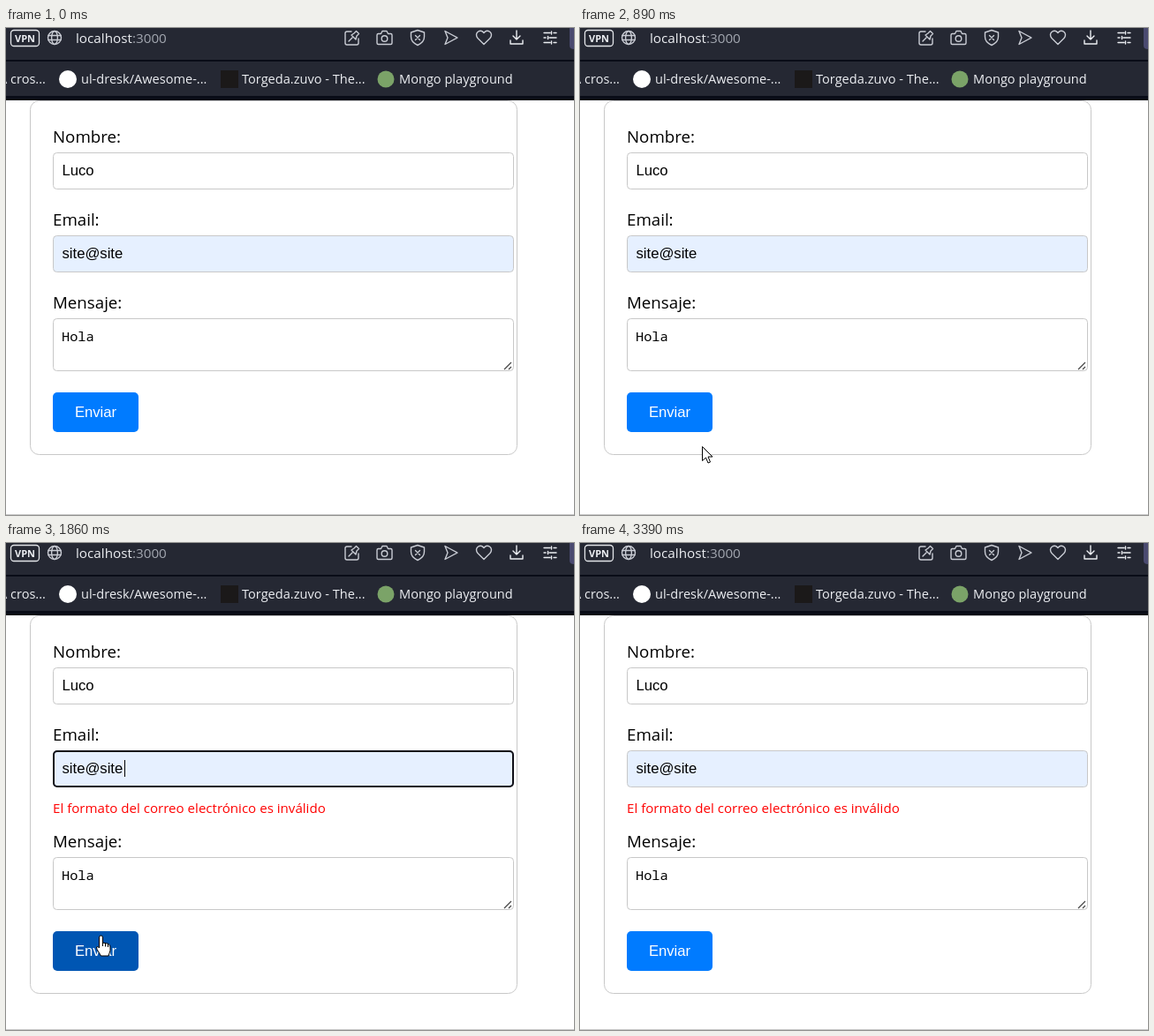
These frames come from a looping animation (643 px wide and 552 px high, 3.62 s). An HTML page:

```html
<!DOCTYPE html>
<html lang="es">
<head>
<meta charset="utf-8">
<title>Formulario</title>
<style>
html, body { margin: 0; width: 100%; height: 100%; overflow: hidden; background: #fff; }
svg { display: block; }
text { font-family: "Open Sans", "Noto Sans", sans-serif; white-space: pre; }
.bar text { font-size: 14.57px; fill: #eceef2; }
.icons { fill: none; stroke: #c9ccd4; stroke-width: 1.4; stroke-linejoin: round; stroke-linecap: round; }
.label { font-size: 18.7px; }
.value { font: 16.67px "Liberation Sans", Arial, sans-serif; }
.box { fill: #fff; stroke: #c8c8c8; }
.cursor { fill: #fff; stroke: #000; stroke-linejoin: round; }
</style>
</head>
<body>
<svg width="643" height="552" viewBox="0 0 643 552">
  <rect width="643" height="552" fill="#fff"/>
  <rect class="box" x="27.5" y="82.5" width="551" height="401" rx="10" id="card"/>

  <g class="bar">
    <rect width="643" height="82" fill="#090c17"/>
    <rect width="643" height="36" fill="#252833"/>
    <rect y="38" width="643" height="39" fill="#252833"/>
    <path d="M643 0h-5v20q0 4 5 4z" fill="#4a4a70"/>
    <rect x="5.5" y="2.5" width="32" height="18" rx="3.5" fill="none" stroke="#e4e6ea" stroke-width="1.3"/>
    <text x="21.5" y="16" text-anchor="middle" style="font-size:11px;font-weight:700">VPN</text>
    <text x="79" y="17" style="font-size:15.25px">localhost<tspan fill="#a3a7b0">:3000</tspan></text>
    <text x="45" y="63" text-anchor="end">A cros...</text>
    <circle cx="70" cy="58" r="10" fill="#fff"/>
    <text x="85" y="63">ul-dresk/Awesome-...</text>
    <rect x="243" y="48" width="20" height="20" fill="#1b1919"/>
    <text x="267" y="63">Torgeda.zuvo - The...</text>
    <circle cx="430" cy="58" r="9.5" fill="#7ba368"/>
    <text x="445" y="63">Mongo playground</text>
    <g class="icons">
      <circle cx="55" cy="11" r="7.5"/>
      <ellipse cx="55" cy="11" rx="3.4" ry="7.5"/>
      <path d="M48 8.5h14M48 13.5h14"/>
      <path d="M391 4h-5q-2 0-2 2v11q0 2 2 2h11q2 0 2-2v-5M388 15l4-4M391 8l5 5 1-4 2.500-2.500-3-3L394 6z"/>
      <path d="M421.500 6.500h3l1.500-3h5l1.500 3h3q1.500 0 1.500 1.500v9q0 1.500-1.500 1.500h-14q-1.500 0-1.500-1.500v-9q0-1.500 1.500-1.500z"/>
      <circle cx="428.500" cy="12" r="3.300"/>
      <path d="M466 2.500l7.500 2.500v5q0 6-7.500 9.500-7.500-3.500-7.500-9.500v-5zM463.500 8.500l5 5m0-5l-5 5"/>
      <path d="M497 3.500l14 7.500-14 7.500 3-7.500z"/>
      <path d="M541 18.500l-7-7q-3-4 0-7 4-3 7 1 3-4 7-1 3 3 0 7z"/>
      <path d="M578 3v10m-4-4l4 4 4-4M571 14v4h14v-4" stroke="#eceef2"/>
      <path d="M609 5.500h7m4 0h3M609 11h2m4 0h8M609 16.500h7m4 0h3M617.500 4v3M613.500 9.500v3M617.500 15v3" stroke="#eceef2"/>
    </g>
  </g>

  <text class="label" x="53" y="130">Nombre:</text>
  <rect class="box" x="53.5" y="141.5" width="521" height="41" rx="4"/>
  <text class="value" x="63.5" y="167">Luco</text>
  <text class="label" x="53" y="224">Email:</text>
  <rect x="53.5" y="235.5" width="521" height="41" rx="4" fill="#e6f0ff" stroke="#c8c8c8"/>
  <rect id="focus" x="54" y="236" width="520" height="40" rx="4" fill="none" stroke="#101018" stroke-width="2"/>
  <text class="value" x="63.5" y="261">site@site</text>
  <rect id="caret" x="134" y="246" width="1" height="19"/>
  <text id="error" x="53" y="306" font-size="15.1" fill="#f00">El formato del correo electrónico es inválido</text>

  <g id="lower">
    <text class="label" x="53" y="318">Mensaje:</text>
    <rect class="box" x="53.5" y="329.5" width="521" height="59" rx="4"/>
    <text x="63" y="355" style="font:15.3px 'Noto Sans Mono','DejaVu Sans Mono',monospace">Hola</text>
    <path d="M564 387l8-8M569 387l3-3" stroke="#444" stroke-width="1.2"/>
    <rect id="button" x="53" y="413" width="97" height="45" rx="5"/>
    <text class="value" x="101.500" y="441" text-anchor="middle" fill="#fff">Enviar</text>
  </g>
  <path d="M0 551.5h643" stroke="#c8c8c8"/>

  <path id="arrow" class="cursor" d="M.5 .5v16l4-3.500 2.500 6 2.500-1-2.500-6h5z"/>
  <g id="hand" class="cursor">
    <path d="M-1.500 2a2 2 0 0 1 4 0v6l6 1.200q2.500 .8 2.500 3.800v4l-2 6h-8.500l-4.500-7.500q-1.500-3.500 1-3l1.500 1.500z"/>
    <path d="M2.500 8v4M5.500 9v3.500M8.500 9.500v3.500" fill="none"/>
  </g>
  <circle id="click" cx="107" cy="444" r="15" fill="#ffe600" fill-opacity=".55"/>
</svg>
<script>
const LOOP = 3620;
const el = id => document.getElementById(id);
const show = (id, on) => el(id).setAttribute('visibility', on ? 'visible' : 'hidden');
const clamp = x => Math.max(0, Math.min(1, x));

// Pointer path: time, x, y
const path = [
  [340, 304, 549], [380, 262, 541], [420, 226, 526], [500, 184, 506], [600, 160, 490],
  [720, 147, 481], [860, 139, 475], [890, 138, 474], [1000, 130, 463], [1050, 126, 457],
  [1200, 114, 449], [1390, 107, 445], [2620, 107, 445], [2640, 119, 445], [2690, 156, 447],
  [2780, 268, 470], [2880, 432, 508], [2930, 546, 545], [2950, 558, 552]
];

function pointer(t) {
  const i = path.findIndex(p => p[0] > t);
  if (i < 1) return null;
  const a = path[i - 1], b = path[i], k = (t - a[0]) / (b[0] - a[0]);
  return [1, 2].map(n => Math.round(a[n] + (b[n] - a[n]) * k));
}

function buttonColor(t) {
  const hover = clamp((t - 1040) / 300) - clamp((t - 2685) / 265);
  const k = hover * hover * (3 - 2 * hover);
  return `rgb(0,${Math.round(123 - 37 * k)},${Math.round(255 - 76 * k)})`;
}

function draw(now) {
  const t = now % LOOP;
  const invalid = t >= 1840, focused = invalid && t < 3390;
  const shift = invalid ? 27 : 0;
  el('card').setAttribute('height', 401 + shift);
  el('lower').setAttribute('transform', `translate(0 ${shift})`);
  el('button').setAttribute('fill', buttonColor(t));
  show('error', invalid);
  show('focus', focused);
  show('caret', focused && (t < 2380 || t >= 2880));

  const p = pointer(t), over = t >= 1040 && t < 2685;
  show('arrow', p && !over);
  show('hand', p && over);
  if (p) el(over ? 'hand' : 'arrow').setAttribute('transform', `translate(${p})`);
  show('click', t >= 1620 && t < 1660);
}

let start;
function tick(now) {
  start ??= now;
  draw(now - start);
  requestAnimationFrame(tick);
}
draw(0);
requestAnimationFrame(tick);
</script>
</body>
</html>
```
